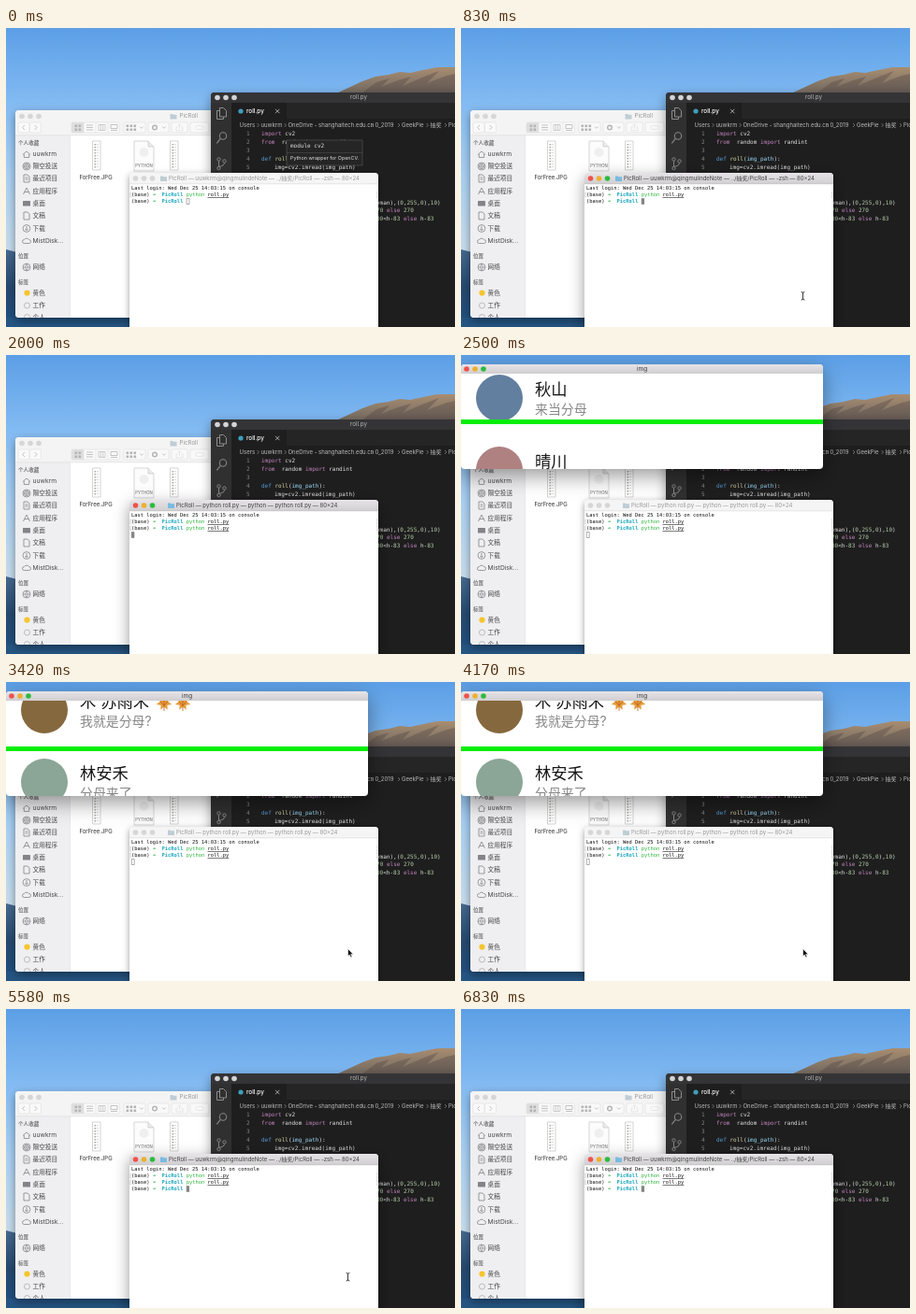
These frames come from a looping animation (480x320 px, 6.91 s). An HTML page with a canvas:

```html
<!DOCTYPE html>
<html lang="zh">
<head>
<meta charset="utf-8">
<title>PicRoll</title>
<style>
  html, body { margin: 0; width: 100%; height: 100%; overflow: hidden; background: #6fb0ee; }
  canvas { display: block; width: 100vw; height: 100vh; }
</style>
</head>
<body>
<canvas id="stage" width="480" height="320"></canvas>
<script>
const ctx = document.getElementById('stage').getContext('2d');
const LOOP = 6910, STEP = 1000 / 12;
const SANS = "Inter, 'Noto Sans CJK SC', 'Noto Sans CJK', sans-serif";
const MONO = "'DejaVu Sans Mono', monospace";
const USER = 'uuwkrm', HOST = 'qingmulindeNote';

// Moments at which the picture switches state, in ms.
const AT = { hoverEnd: 330, focus: 660, recall: 1250, run: 1600, open: 2330,
             arrow: 2600, settle: 3330, close: 4580, prompt: 5000, hide: 6300 };
const within = (t, a, b) => t >= a && t < b;

function rect(x, y, w, h, fill) {
  ctx.fillStyle = fill;
  ctx.fillRect(x, y, w, h);
}
function round(x, y, w, h, r, fill, stroke) {
  ctx.beginPath();
  ctx.roundRect(x, y, w, h, r);
  if (fill) { ctx.fillStyle = fill; ctx.fill(); }
  if (stroke) { ctx.strokeStyle = stroke; ctx.lineWidth = 0.6; ctx.stroke(); }
}
function disc(x, y, r, fill, stroke) {
  ctx.beginPath();
  ctx.arc(x, y, r, 0, 7);
  if (fill) { ctx.fillStyle = fill; ctx.fill(); }
  if (stroke) { ctx.strokeStyle = stroke; ctx.stroke(); }
}
function path(d, stroke, width = 0.8, fill) {
  const p = new Path2D(d);
  if (fill) { ctx.fillStyle = fill; ctx.fill(p); }
  if (stroke) { ctx.strokeStyle = stroke; ctx.lineWidth = width; ctx.stroke(p); }
}
function text(s, x, y, size, fill, { font = SANS, weight = 400, align = 'left' } = {}) {
  ctx.font = `${weight} ${size}px ${font}`;
  ctx.textAlign = align;
  ctx.textBaseline = 'middle';
  ctx.fillStyle = fill;
  ctx.fillText(s, x, y);
}
function gradient(y0, y1, ...colors) {
  const g = ctx.createLinearGradient(0, y0, 0, y1);
  colors.forEach((c, i) => g.addColorStop(i / (colors.length - 1), c));
  return g;
}
function panel(x, y, w, h, r, fill, blur) {
  ctx.save();
  ctx.shadowColor = 'rgba(0,0,0,.4)';
  ctx.shadowBlur = blur;
  ctx.shadowOffsetY = blur / 3;
  round(x, y, w, h, r, fill);
  ctx.restore();
}
function lights(x, y, colors) {
  colors.forEach((c, i) => disc(x + i * 9, y, 2.8, c));
}
const LIVE = ['#f0524c', '#ecb02f', '#2dbb40'], IDLE = Array(3).fill('#d6d6d6');

function folder(x, y, color = '#78bbe2') {
  path(`M${x} ${y - 2.6}h2.6l.8 .9h3.6v4.6h-7z`, null, 0, color);
}

function desktop() {
  rect(0, 0, 480, 320, gradient(0, 235, '#5c9fe6', '#82baf2', '#a9d0f2', '#c6dcec'));
  path('M353 70L366 64 381 57 395 52 409 50 421 47 432 48 446 45 461 42 480 42V72z', null, 0,
       gradient(42, 72, '#a88d70', '#8b7a69', '#71685f'));
  path('M380 70L396 58 410 54 401 63 419 56 433 52 424 62 447 52 463 46 450 59 471 51 480 49V70z',
       null, 0, 'rgba(75,65,64,.35)');
  path('M0 237L12 240V320H0z', null, 0, gradient(235, 320, '#476a90', '#26496f', '#1f5183'));
  rect(0, 310, 132, 10, '#255583');
}

function sidebar() {
  const ink = '#464649', icon = '#848488';
  const label = (s, y) => text(s, 28.5, y, 6.7, ink);
  const heading = (s, y) => text(s, 13, y, 5.6, '#77777a', { weight: 600 });
  heading('个人收藏', 123);
  heading('位置', 244);
  heading('标签', 272);
  [[USER, 135], ['隔空投送', 148], ['最近项目', 161], ['应用程序', 174.5], ['桌面', 188],
   ['文稿', 201], ['下载', 214.5], ['MistDisk...', 228], ['网络', 256], ['黄色', 283.5],
   ['工作', 297], ['个人', 309.5]].forEach(([s, y]) => label(s, y));
  path('M18 135.5l4-3.5 4 3.5M19.3 135v3.5h5.4v-3.5', icon);
  ctx.lineWidth = 0.8;
  [1.2, 2.6, 4].forEach(r => disc(22, 148, r, null, icon));
  path('M19 157h4l2 2v6h-6zM20.5 160h3M20.5 162h3', icon);
  path('M18.5 178l3.5-7 3.5 7M19.5 175.5h5', icon);
  round(18, 185, 8, 5.5, 0.6, icon);
  path('M19 197h4l2 2v6h-6z', icon);
  disc(22, 214.5, 3.9, null, icon);
  path('M22 212v4.5M20.4 215l1.6 1.7 1.6-1.7', icon);
  path('M19.5 230.5a2 2 0 0 1 0-4a3 3 0 0 1 5 0a2 2 0 0 1 0 4z', icon);
  disc(22, 256, 3.9, null, icon);
  path('M18 256h8M22 252q-3 4 0 8M22 252q3 4 0 8', icon, 0.6);
  disc(22.5, 283.5, 3.1, '#f5c52d');
  ctx.lineWidth = 0.7;
  disc(22.5, 297, 3, null, '#a5a5a8');
  disc(22.5, 309.5, 3, null, '#a5a5a8');
}

function fileStrip(x) {
  rect(x, 121, 8.5, 31, '#fff');
  path(`M${x} 121h8.5v31h-8.5z`, '#c2c2c2', 0.7);
  for (let y = 124; y < 150; y += 3) {
    rect(x + 2, y, 1.6, 1.5, '#aaa69f');
    rect(x + 4.2, y + 0.3, 2.4, 0.6, '#c6c6c6');
  }
}

function finder() {
  panel(10, 88, 240, 222, 4, '#fff', 10);
  ctx.save();
  ctx.beginPath();
  ctx.roundRect(10, 88, 240, 222, 4);
  ctx.clip();
  rect(10, 88, 240, 27, '#f4f4f4');
  rect(10, 115, 58, 195, '#efeef0');
  rect(10, 114.6, 240, 0.6, '#d6d6d6');
  rect(68, 115, 0.6, 195, '#dadada');
  lights(17, 94.5, IDLE);
  folder(175.5, 94.5, '#bfcdd5');
  text('PicRoll', 185.5, 94.5, 6.2, '#989898');
  const line = '#dedede', mark = '#b4b4b4';
  [[13, 12], [25.5, 12], [70, 51.5], [126, 23], [152, 22], [177, 17], [197, 20]]
    .forEach(([x, w]) => round(x, 101, w, 11, 1.6, '#f9f9f9', line));
  round(70, 101, 13, 11, [1.6, 0, 0, 1.6], '#dfdfdf');
  path('M20 104l-2.5 2.5 2.5 2.5M30.5 104l2.5 2.5-2.5 2.5', mark);
  path('M83 101v11M96 101v11M109 101v11', line, 0.6);
  for (const x of [73.5, 77.5, 128.5, 132.5, 136.5])
    for (const y of [103.5, 107.5]) rect(x, y, 2.6, 2.6, mark);
  path('M86 104h7M86 106.5h7M86 109h7', mark);
  path('M99 103.5h7v6h-7zM101.3 103.5v6M103.7 103.5v6', mark, 0.6);
  path('M112 103.5h7v4h-7zM112 109.5h7', mark);
  path('M143 105.5l1.8 1.8 1.8-1.8M167 105.5l1.8 1.8 1.8-1.8', mark);
  ctx.lineWidth = 1.4;
  disc(159, 106.5, 2.3, null, mark);
  path('M183.5 106h-1.5v4h7v-4h-1.5M185.5 108v-5M183.8 104.5l1.7-1.7 1.7 1.7', line, 0.7);
  round(203, 104.5, 8, 4, 1.5, null, line);
  sidebar();
  fileStrip(92.5);
  path('M137 121h15l6 6v26h-21z', '#c6c6c6', 0.7, '#fcfcfc');
  path('M152 121v6h6', '#c6c6c6', 0.7, '#ebebeb');
  disc(147.5, 133, 5, '#efefef');
  text('PYTHON', 147.5, 148, 4.3, '#777', { align: 'center', weight: 500 });
  fileStrip(175.5);
  text('ForFree.JPG', 96, 160, 6, '#2c2c2c', { align: 'center' });
  ctx.restore();
}

// Draws coloured pieces of one monospaced line next to each other.
function codeLine(x, y, size, pieces) {
  for (const [s, color, weight] of pieces) {
    text(s, x, y, size, color, { font: MONO, weight });
    x += ctx.measureText(s).width;
  }
}

function editor(hover) {
  panel(219, 69, 270, 260, 4, '#1e1e1e', 12);
  round(219, 69, 270, 11, [4, 0, 0, 0], '#343436');
  lights(226, 74.5, Array(3).fill('#d4d4d5'));
  text('roll.py', 377, 74.5, 6.2, '#b5b5b5', { align: 'center' });
  rect(219, 80, 22, 240, '#303031');
  rect(241, 80, 239, 17, '#252526');
  rect(241, 80, 59, 17, '#1e1e1e');
  disc(251, 89, 2.6, '#3f9fbd');
  text('roll.py', 257, 89, 6.4, '#fff', { weight: 500 });
  path('M288 86.8l4.4 4.4M292.4 86.8l-4.4 4.4', '#c5c5c5');
  path('M228.5 85.5h4l3 3v6.5h-7zM228.5 88.5h-3v9h7v-2.5', '#8c8c8c', 1);
  ctx.lineWidth = 1.1;
  disc(232, 115.5, 3.7, null, '#858585');
  path('M229.3 118.3l-4 5', '#858585', 1.2);
  ctx.lineWidth = 1;
  [[227.5, 140.5], [227.5, 150], [233.5, 142.5]].forEach(([x, y]) => disc(x, y, 1.7, null, '#858585'));
  path('M227.5 142.3v6M233.5 144.3q0 3.4-6 4', '#858585', 1);

  const crumbs = [['Users', 249.5], [USER, 272.5], ['OneDrive - shanghaitech.edu.cn', 301.5],
    ['0_2019', 394.5], ['GeekPie', 423], ['抽奖', 453.5], ['PicRoll', 473]];
  crumbs.forEach(([s, x], i) => {
    text(s, x, 104, 6, '#bababa');
    if (i) path(`M${x - 4} 102l2 2-2 2`, '#a0a0a0', 0.6);
  });

  const plain = '#e2e2e2', key = '#c586c0', blue = '#569cd6', fn = '#dcdcaa',
        arg = '#9cdcfe', num = '#b5cea8';
  const rows = [[113.5, 273, ['import', key], [' cv2', plain]],
    [122.5, 273, ['from', key], ['  random ', plain], ['import', key], [' randint', plain]],
    [140.5, 273, ['def', blue], [' roll', fn], ['(', plain], ['img_path', arg], ['):', plain]],
    [149.5, 287, ['img=cv2.imread(img_path)', plain]],
    [187, 396, ['yman),(', plain], ['0', num], [',', plain], ['255', num], [',', plain],
      ['0', num], ['),', plain], ['10', num], [')', plain]],
    [195.5, 392.5, ['270', num], [' else ', key], ['270', num]],
    [204.5, 396, ['00', num], ['<h-', plain], ['83', num], [' else', key], [' h-', plain], ['83', num]]];
  rows.forEach(([y, x, ...pieces]) => codeLine(x, y, 6, pieces));
  for (let n = 1; n <= 5; n++)
    text(n, 260.5, 104.5 + n * 9, 6, '#858585', { font: MONO, align: 'right' });

  if (hover) {
    round(300, 120, 81, 27, 0, '#252526', '#5a5a5b');
    rect(300, 133, 81, 0.6, '#4b4b4c');
    text('module cv2', 304, 126.5, 6, '#e2e2e2', { font: MONO });
    text('Python wrapper for OpenCV.', 304, 139.5, 5.4, '#e0e0e0');
  }
}

function promptLine(y, command) {
  codeLine(134, y, 5.42, [['(base) ', '#111'], ['➜', '#27a83b', 700]]);
  codeLine(166.6, y, 5.42, [['PicRoll', '#19a6bb', 700]]);
  if (!command) return;
  codeLine(192.7, y, 5.42, [['python', '#2eb53c']]);
  codeLine(215.5, y, 5.42, [['roll.py', '#111']]);
  rect(215.5, y + 2.7, 22.8, 0.6, '#222');
}

function terminalTitle(t) {
  const shell = `PicRoll — ${USER}@${HOST} — ../抽奖/PicRoll — `;
  if (within(t, AT.run, AT.close)) return ['PicRoll — python roll.py — python — python roll.py — 80×24', 182];
  if (within(t, AT.close, AT.prompt)) return [shell + 'python roll.py — 80…', 174];
  return [shell + '-zsh — 80×24', 174];
}

function terminal(t) {
  const active = t >= AT.focus && !within(t, AT.open, AT.close);
  panel(132, 155, 266, 180, 4, '#fff', active ? 16 : 7);
  round(132, 155, 266, 12, [4, 4, 0, 0], active ? gradient(155, 167, '#e6e4e6', '#d0ced0') : '#f5f5f5');
  rect(132, 166.6, 266, 0.6, active ? '#bdbdbd' : '#d8d8d8');
  lights(138.5, 161, active ? LIVE : IDLE);
  const [title, x] = terminalTitle(t);
  folder(x - 9, 161, active ? undefined : '#bfcdd5');
  text(title, x, 161, 6, active ? '#414141' : '#999');

  text('Last login: Wed Dec 25 14:03:15 on console', 134, 171.3, 5.42, '#111', { font: MONO });
  promptLine(178.5, true);
  promptLine(185.5, t >= AT.recall);
  if (t >= AT.prompt) promptLine(192.5, false);
  const marked = t >= AT.run ? [178.5, 185.5] : [178.5];
  marked.forEach(y => path(`M134 ${y - 2.5}h-1v5h1M396 ${y - 2.5}h1v5h-1`, '#aaa', 0.5));

  const running = within(t, AT.run, AT.prompt);
  const col = running ? 0 : within(t, AT.recall, AT.run) ? 32 : 18;
  const cx = 134 + col * 3.263, cy = t >= AT.run ? 192.5 : 185.5;
  if (active && !within(t, AT.open, AT.prompt)) rect(cx, cy - 3.3, 3.3, 6.6, '#858585');
  else round(cx + 0.3, cy - 3, 2.9, 6, 0, null, '#777');
}

const PEOPLE = [['木 苏雨禾', '我就是分母?', '#86683e', 2], ['林安禾', '分母来了', '#8ba596', 0],
  ['江晚舟', '分母+1', '#b7a58f', 0], ['秋山', '来当分母', '#627f9f', 0], ['晴川', '分母报到', '#af8181', 0]];

function leaf(x, y) {
  ctx.beginPath();
  for (let i = 0; i < 14; i++) {
    const r = i % 2 ? 4.4 : 8.5, a = i * Math.PI / 7 - Math.PI / 2;
    ctx.lineTo(x + r * Math.cos(a), y + r * Math.sin(a));
  }
  ctx.fillStyle = '#e69a38';
  ctx.fill();
  path(`M${x} ${y - 4}v13M${x - 4} ${y - 1}l4 4 4-4`, '#b95e22', 0.8);
}

function person(index, y) {
  const [name, message, color, leaves] = PEOPLE[index % PEOPLE.length];
  disc(41, y, 25, color);
  text(name, 79, y - 8, 17.3, '#171717');
  for (let i = 0; i < leaves; i++) leaf(169 + i * 20, y - 8);
  text(message, 79, y + 12.5, 13.9, '#888');
}

function pictureWindow(t) {
  panel(0, 10, 387, 112, 4, '#fff', 22);
  ctx.save();
  ctx.beginPath();
  ctx.rect(0, 20, 387, 102);
  ctx.clip();
  const seed = Math.sin(Math.floor((t - AT.open) / STEP + 1) * 12.9898) * 43758.5453;
  const scroll = t < AT.settle ? (seed - Math.floor(seed)) * PEOPLE.length : 0;
  const first = Math.floor(scroll);
  for (let i = 0; i < 4; i++) person(first + i, 30 + (first + i - scroll) * 77);
  rect(0, 69, 387, 5, '#05ee08');
  ctx.restore();
  round(0, 10, 387, 10, [4, 4, 0, 0], gradient(10, 20, '#e6e4e6', '#d0ced0'));
  lights(6, 15, LIVE);
  text('img', 193.5, 15, 6.5, '#414141', { align: 'center' });
}

function pointer(t) {
  if (t < AT.hoverEnd || within(t, AT.recall, AT.arrow) || t >= AT.hide) return;
  const k = Math.min(1, (t - AT.hoverEnd) / (AT.focus - AT.hoverEnd));
  const ease = k * k * (3 - 2 * k);
  const x = 303 + 62.5 * ease, y = 113 + 173.5 * ease;
  if (within(t, AT.arrow, AT.close))
    path(`M${x} ${y - 1}v8l1.8-1.6 1.3 2.9 1.4-.6-1.3-2.8h2.5z`, '#fff', 0.6, '#111');
  else
    path(`M${x - 1.8} ${y - 4}q1.8 0 1.8 1.2q0-1.2 1.8-1.2M${x} ${y - 3}v6.6M${x - 1.8} ${y + 4.5}q1.8 0 1.8-1.2q0 1.2 1.8 1.2`,
         '#222', 0.9);
}

function draw() {
  const t = performance.now() % LOOP;
  desktop();
  finder();
  editor(t < AT.hoverEnd);
  terminal(t);
  if (within(t, AT.open, AT.close)) pictureWindow(t);
  pointer(t);
  requestAnimationFrame(draw);
}
draw();
</script>
</body>
</html>
```
